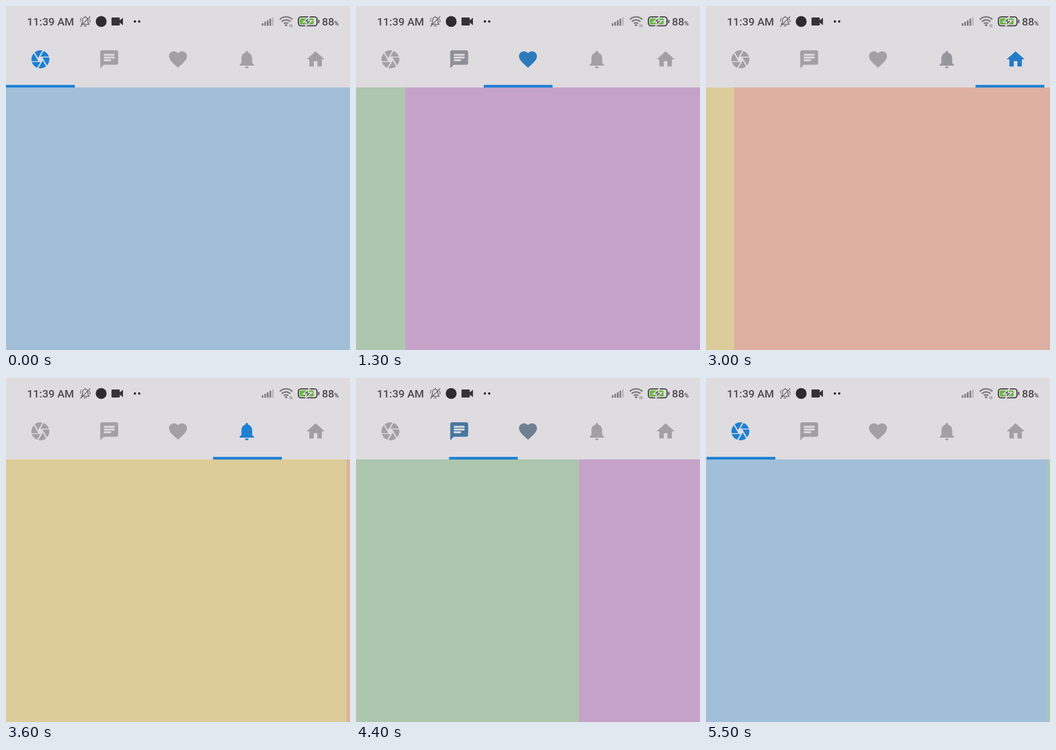
Write an HTML page that moves like this. It is 600 px wide and 600 px high and loops after 5.6 s.

```html
<!DOCTYPE html>
<html lang="en">
<head>
<meta charset="utf-8">
<title>Swipeable tabs</title>
<style>
  html, body { margin: 0; width: 100%; height: 100%; overflow: hidden; background: #dfdce0; }
  svg { display: block; width: 600px; height: 600px; }
  text { font-family: Roboto, sans-serif; font-weight: 500; fill: #4b4a4d; }
</style>
</head>
<body>
<svg viewBox="0 0 600 600">
  <rect width="600" height="600" fill="#dfdce0"/>

  <g id="status">
    <text x="36.5" y="34" font-size="19">11:39 AM</text>
    <g fill="none" stroke="#69686b" stroke-width="1.5" stroke-linecap="round" stroke-linejoin="round">
      <path d="M131.500 32h13.500l-2-3v-4.500a4.800 5 0 0 0-9.600 0v4.500zM138.200 19v-1M136.500 34.800h3.400"/>
      <path d="M130 35.500L146.500 18.500"/>
      <path d="M131.200 21q-2 3 -1.200 6M145.500 22.500q2 3 .8 6" stroke-width="1.200"/>
    </g>
    <circle cx="166" cy="27" r="9.500" fill="#2c2b2e"/>
    <path d="M185.500 20h11.500q1.500 0 1.500 1.500v3.500l5.500-4.500v13l-5.500-4.500v3.500q0 1.500-1.500 1.500h-11.500q-1.500 0-1.500-1.500v-11q0-1.500 1.500-1.500z" fill="#343336"/>
    <g fill="#18171a"><circle cx="224.800" cy="27" r="2"/><circle cx="232.400" cy="27" r="2"/></g>

    <g fill="#7c7b7e">
      <rect x="446" y="30" width="3" height="4.500" rx="1"/>
      <rect x="450.500" y="27.500" width="3" height="7" rx="1"/>
      <rect x="455" y="25" width="3" height="9.500" rx="1"/>
      <rect x="459.500" y="22" width="3" height="12.500" rx="1"/>
      <rect x="464" y="19.500" width="3" height="15" rx="1" fill="#bcbabd"/>
    </g>
    <g fill="none" stroke="#7c7b7e" stroke-width="2.500">
      <path d="M477.500 23.500a15.500 15.500 0 0 1 22 0M481 27.300a10.500 10.500 0 0 1 15 0M484.600 30.800a5.500 5.500 0 0 1 7.800 0"/>
      <path d="M495.500 32v5M498.500 32v5" stroke-width="1.200"/>
    </g>
    <circle cx="488.500" cy="33.500" r="2" fill="#7c7b7e"/>

    <rect x="510" y="19" width="32.500" height="15.500" rx="4.500" fill="none" stroke="#454547" stroke-width="2.200"/>
    <rect x="512.500" y="21.500" width="24" height="10.500" rx="1.800" fill="#67b93c"/>
    <rect x="544.500" y="24" width="2" height="6" rx="1" fill="#454547"/>
    <path d="M529 18.500L518.500 28h6l-2 7.500L533.500 25.500h-6.500z" fill="#59615a" stroke="#dfdce0" stroke-width="1.800"/>
    <text x="551" y="34" font-size="19">88</text>
    <text x="572.200" y="34" font-size="11">%</text>
  </g>

  <g id="pages"></g>
  <g id="tabs"></g>
  <rect id="bar" y="137.600" width="120" height="4.600" fill="#1c80d4"/>
</svg>

<script>
  const NS = 'http://www.w3.org/2000/svg';
  const LOOP = 5600, STEP = 100;
  const PAGE_COLORS = ['#a2bfda', '#adc6ae', '#c5a3c9', '#dccc9a', '#deb0a1'];
  const ICONS = [
    'M9.4 10.5l4.77-8.26C13.47 2.09 12.75 2 12 2c-2.4 0-4.6.85-6.32 2.25l3.66 6.35.06-.1zM21.54 9c-.92-2.92-3.15-5.26-6-6.34L11.88 9h9.66zm.26 1h-7.49l.29.5 4.76 8.25C21 16.97 22 14.61 22 12c0-.69-.07-1.35-.2-2zM8.54 12l-3.9-6.75C3.01 7.03 2 9.39 2 12c0 .69.07 1.35.2 2h7.49l-1.15-2zm-6.08 3c.92 2.92 3.15 5.26 6 6.34L12.12 15H2.46zm11.27 0l-3.9 6.76c.7.15 1.42.24 2.17.24 2.4 0 4.6-.85 6.32-2.25l-3.66-6.35-.93 1.6z',
    'M20 2H4c-1.1 0-1.99.9-1.99 2L2 22l4-4h14c1.1 0 2-.9 2-2V4c0-1.1-.9-2-2-2zM6 9h12v2H6V9zm8 5H6v-2h8v2zm4-6H6V6h12v2z',
    'M12 21.35l-1.45-1.32C5.4 15.36 2 12.28 2 8.5 2 5.42 4.42 3 7.5 3c1.74 0 3.41.81 4.5 2.09C13.09 3.81 14.76 3 16.5 3 19.58 3 22 5.42 22 8.5c0 3.78-3.4 6.86-8.55 11.54L12 21.35z',
    'M12 22c1.1 0 2-.9 2-2h-4c0 1.1.89 2 2 2zm6-6v-5c0-3.07-1.64-5.64-4.5-6.32V4c0-.83-.67-1.5-1.5-1.5s-1.5.67-1.5 1.5v.68C7.63 5.36 6 7.92 6 11v5l-2 2v1h16v-1l-2-2z',
    'M10 20v-6h4v6h5v-8h3L12 3 2 12h3v8z'
  ];

  // Each swipe: [direction, midpoint in ms, steepness per ms]
  const SWIPES = [
    [1, 450, .015], [1, 1181, .015], [1, 1942, .015], [1, 2839, .015],
    [-1, 3401, .022], [-1, 3900, .02], [-1, 4358, .0145], [-1, 5180, .015]
  ];

  const $ = id => document.getElementById(id);

  function add(parent, tag, attrs) {
    const el = document.createElementNS(NS, tag);
    for (const key in attrs) el.setAttribute(key, attrs[key]);
    return parent.appendChild(el);
  }

  PAGE_COLORS.forEach((fill, i) =>
    add($('pages'), 'rect', { x: i * 600, y: 142, width: 600, height: 458, fill }));

  const icons = ICONS.map((d, i) => add($('tabs'), 'path', {
    d, transform: `translate(${60 + i * 120} 93) scale(1.565) translate(-12 -12)`
  }));

  function position(t) {
    if (t < 200) return 0;
    const p = SWIPES.reduce((sum, [dir, mid, k]) => sum + dir / (1 + Math.exp(k * (mid - t))), 0);
    return Math.max(0, Math.min(4, p));
  }

  // Inactive icons are translucent black, so colour and alpha blend together.
  function iconColor(w) {
    return `rgba(${28 * w}, ${128 * w}, ${212 * w}, ${.27 + .73 * w})`;
  }

  function draw(now) {
    const t = Math.floor(now % LOOP / STEP) * STEP;
    const p = position(t);
    $('pages').setAttribute('transform', `translate(${-Math.round(p * 600)} 0)`);
    $('bar').setAttribute('x', p * 120);
    icons.forEach((icon, i) => { icon.style.fill = iconColor(Math.max(0, 1 - Math.abs(p - i))); });
  }

  const start = performance.now();
  function tick() {
    draw(performance.now() - start);
    requestAnimationFrame(tick);
  }
  tick();
</script>
</body>
</html>
```
